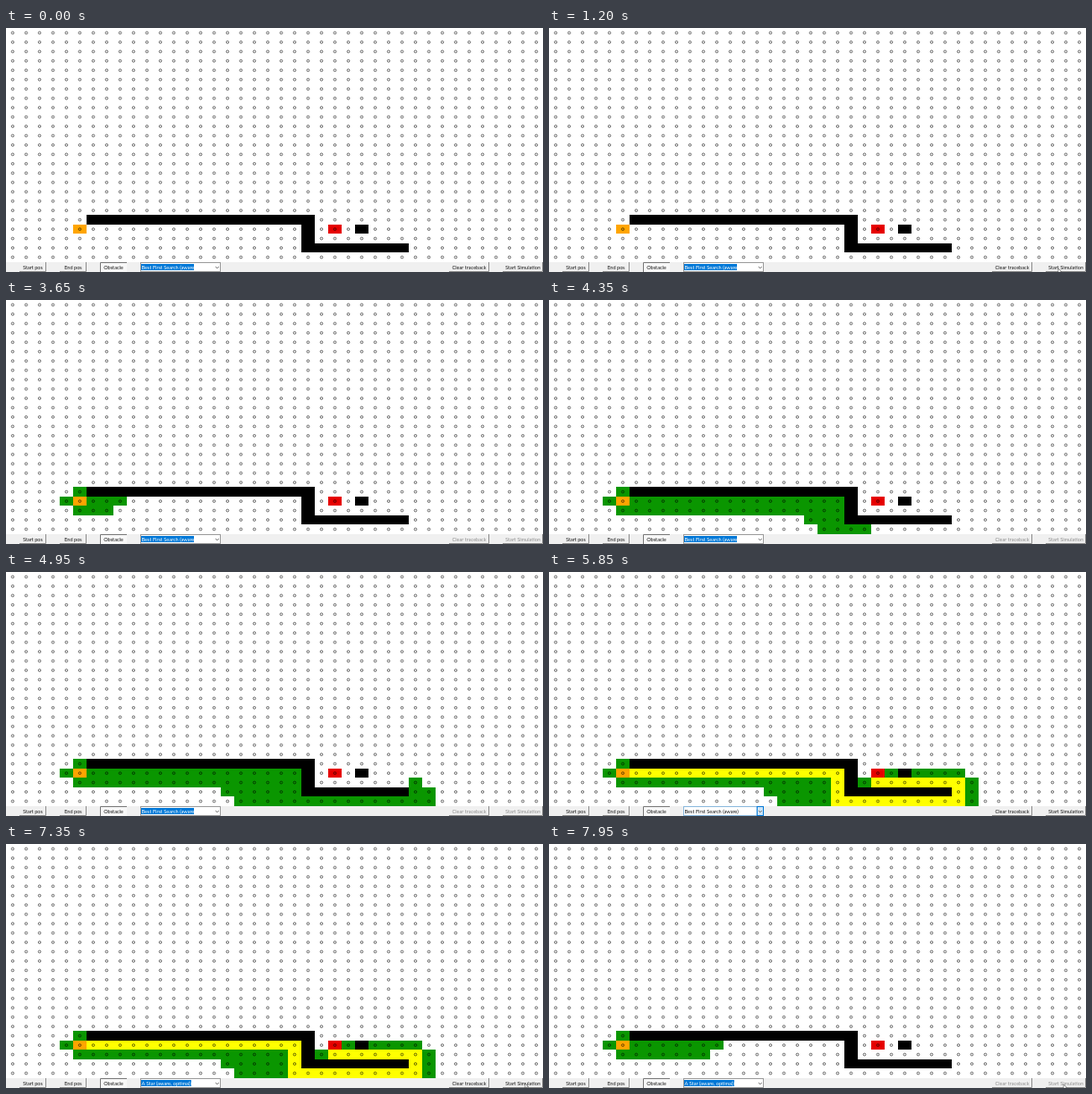
An HTML page with a canvas for the animation above (8000 ms loop, 600 by 273 pixels).

```html
<!DOCTYPE html>
<html lang="en">
<head>
<meta charset="utf-8">
<title>Path finding</title>
<style>
html, body { margin: 0; width: 100%; height: 100%; overflow: hidden; background: #fff; }
canvas { display: block; width: 600px; height: 273px; }
</style>
</head>
<body>
<canvas id="stage" width="600" height="273"></canvas>
<script>
const ctx = document.getElementById('stage').getContext('2d');
const LOOP = 8000, COLS = 40, ROWS = 25, CELL_W = 15, CELL_H = 10.46, BAR_Y = 262;
const START = [5, 21], END = [24, 21];
const STEP = 100 / 3, TRACE_STEP = 15;
const RUN_1 = 3545, RUN_2 = 7710;
const OPEN_LIST = 5750, PICKED = 6500;
const GREEN = '#0a9600', YELLOW = '#ffff00', BLUE = '#0078d7';

const id = ([c, r]) => r * COLS + c;
const walls = new Set();
function wall(c0, r0, c1, r1) {
  for (let r = r0; r <= r1; r++)
    for (let c = c0; c <= c1; c++) walls.add(id([c, r]));
}
wall(6, 20, 22, 20);
wall(22, 20, 22, 23);
wall(22, 23, 29, 23);
wall(26, 21, 26, 21);

// Greedy search; equal distances are taken first in, first out.
function search() {
  const dist = ([c, r]) => Math.abs(c - END[0]) + Math.abs(r - END[1]);
  const parent = new Map([[id(START), null]]);
  const queue = [START], steps = [], path = [];
  while (queue.length) {
    let best = 0;
    queue.forEach((cell, i) => { if (dist(cell) < dist(queue[best])) best = i; });
    const cell = queue.splice(best, 1)[0];
    if (id(cell) === id(END)) break;
    const found = [];
    for (const [dx, dy] of [[-1, 0], [1, 0], [0, -1], [0, 1]]) {
      const next = [cell[0] + dx, cell[1] + dy], key = id(next);
      if (next[0] < 0 || next[0] >= COLS || next[1] < 0 || next[1] >= ROWS) continue;
      if (walls.has(key) || parent.has(key)) continue;
      parent.set(key, cell);
      queue.push(next);
      found.push(next);
    }
    steps.push(found);
  }
  for (let p = parent.get(id(END)); p && id(p) !== id(START); p = parent.get(id(p))) path.push(p);
  return { steps, path };
}
const { steps, path } = search();
const RUN_1_END = RUN_1 + steps.length * STEP;
const TRACED = RUN_1_END + path.length * TRACE_STEP;

function fillCell([c, r], color) {
  const y = Math.round(r * CELL_H);
  ctx.fillStyle = color;
  ctx.fillRect(c * CELL_W, y, CELL_W, Math.round((r + 1) * CELL_H) - y);
}

function box(x, y, w, h, fill, stroke) {
  ctx.fillStyle = fill;
  ctx.fillRect(x, y, w, h);
  ctx.strokeStyle = stroke;
  ctx.lineWidth = 1;
  ctx.strokeRect(x + 0.5, y + 0.5, w - 1, h - 1);
}

function label(text, x, color, align) {
  ctx.font = '5.6px Lato, "Open Sans", sans-serif';
  ctx.textAlign = align;
  ctx.textBaseline = 'alphabetic';
  ctx.fillStyle = color;
  ctx.fillText(text, x, 269.7);
}

function line(points, color, width) {
  ctx.beginPath();
  points.forEach(([x, y]) => ctx.lineTo(x, y));
  ctx.strokeStyle = color;
  ctx.lineWidth = width;
  ctx.stroke();
}

function button(text, x, w, enabled = true) {
  ctx.fillStyle = '#f0f0f0';
  ctx.fillRect(x, BAR_Y, w, 11);
  line([[x + w - 0.5, BAR_Y], [x + w - 0.5, 272.5], [x, 272.5]], '#8c8c8c', 1);
  label(text, x + w / 2, enabled ? '#111' : '#8c8c8c', 'center');
}

function pressedButton(text, x, w) {
  ctx.fillStyle = '#f7f7f7';
  ctx.fillRect(x, BAR_Y, w, 11);
  line([[x + 0.5, 273], [x + 0.5, BAR_Y + 0.5], [x + w, BAR_Y + 0.5]], '#777', 1);
  label(text, x + w / 2, '#111', 'center');
}

function combo(t) {
  const open = t >= OPEN_LIST && t < PICKED;
  const text = t < PICKED ? 'Best First Search (aware)' : 'A Star (aware, optimal)';
  box(150, BAR_Y, 90, 11, '#fff', open ? '#8ab8dd' : '#9a9a9a');
  if (!open) {
    ctx.fillStyle = BLUE;
    ctx.fillRect(151, 264, t < PICKED ? 59 : 56, 7);
  }
  label(text, 151.5, open ? '#111' : '#fff', 'left');
  if (open) box(232, BAR_Y, 8, 11, '#cce4f7', BLUE);
  line([[234.2, 267], [236, 268.8], [237.8, 267]], '#444', 0.8);
}

// Each key: time, x, y of the pointer tip.
const pointerKeys = [
  [900, 583, 280], [1100, 569, 269], [3500, 569, 269], [3620, 569, 282],
  [6700, 519, 282], [7200, 580, 268], [7400, 580, 268], [7650, 575, 269], [8000, 575, 269]
];
function pointer(t) {
  const i = pointerKeys.findIndex(k => k[0] > t);
  if (i < 1) return;
  const [t0, x0, y0] = pointerKeys[i - 1], [t1, x1, y1] = pointerKeys[i];
  const k = (t - t0) / (t1 - t0), e = k * k * (3 - 2 * k);
  ctx.save();
  ctx.translate(x0 + (x1 - x0) * e, y0 + (y1 - y0) * e);
  ctx.beginPath();
  [[0, 0], [0, 5], [1.3, 4], [2.2, 5.6], [3, 5.2], [2.3, 3.7], [3.7, 3.6]].forEach(p => ctx.lineTo(...p));
  ctx.closePath();
  ctx.fillStyle = '#fff';
  ctx.fill();
  ctx.strokeStyle = '#333';
  ctx.lineWidth = 0.5;
  ctx.stroke();
  ctx.restore();
}

function grid(t) {
  const run = t >= RUN_2 ? RUN_2 : RUN_1;
  const done = Math.max(0, Math.floor((t - run) / STEP));
  for (const found of steps.slice(0, done)) found.forEach(c => fillCell(c, GREEN));
  if (run === RUN_1 && t >= RUN_1_END) {
    const traced = Math.ceil((t - RUN_1_END) / TRACE_STEP);
    path.slice(0, traced).forEach(c => fillCell(c, YELLOW));
  }
  fillCell(START, '#ffa500');
  fillCell(END, '#e60000');
  walls.forEach(k => fillCell([k % COLS, Math.floor(k / COLS)], '#000'));

  ctx.strokeStyle = 'rgba(0,0,0,0.72)';
  ctx.lineWidth = 0.8;
  for (let r = 0; r < ROWS; r++)
    for (let c = 0; c < COLS; c++) {
      if (walls.has(id([c, r]))) continue;
      ctx.beginPath();
      ctx.arc((c + 0.5) * CELL_W, (r + 0.5) * CELL_H + 0.2, 1.4, 0, Math.PI * 2);
      ctx.stroke();
    }
}

function draw(t) {
  ctx.fillStyle = '#fff';
  ctx.fillRect(0, 0, 600, 273);
  grid(t);
  ctx.fillStyle = '#f0f0f0';
  ctx.fillRect(0, BAR_Y, 600, 11);
  const idle = t < RUN_1 || (t >= TRACED && t < RUN_2);
  button('Start pos', 15, 30);
  button('End pos', 60, 30);
  pressedButton('Obstacle', 105, 30);
  combo(t);
  button('Clear traceback', 495, 45, idle);
  button('Start Simulation', 555, 45, idle);
  pointer(t);
}

const began = performance.now();
function tick() {
  draw((performance.now() - began) % LOOP);
  requestAnimationFrame(tick);
}
tick();
</script>
</body>
</html>
```
